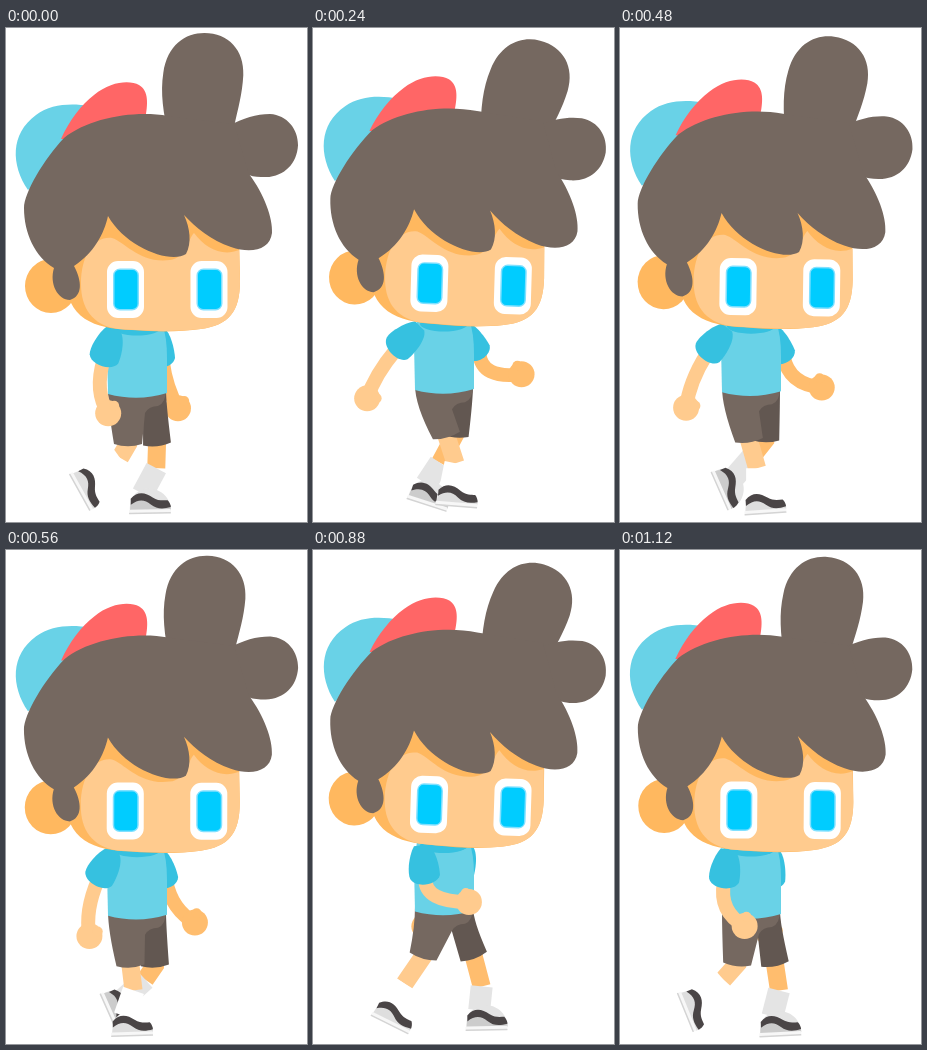
Write an HTML page with a canvas that moves like this. It is 301 px wide and 494 px high and loops after 1200 ms.

```html
<!DOCTYPE html>
<html lang="en">
<head>
<meta charset="utf-8">
<title>Walking boy</title>
<style>
html, body { margin: 0; width: 100%; height: 100%; overflow: hidden; background: #fff; }
canvas { display: block; width: 100vw; height: 100vh; }
</style>
</head>
<body>
<canvas id="stage" width="301" height="494"></canvas>
<script>
const ctx = document.getElementById('stage').getContext('2d');
const LOOP = 1200, STEP = 80;

const C = {
  hair: '#756860', skin: '#ffcb8e', shade: '#ffb85f', farSkin: '#ffbd6e',
  shirt: '#69d2e7', sleeve: '#36c1e0', red: '#ff6666',
  iris: '#00ccff', irisEdge: '#80e0ff',
  shorts: '#756860', farShorts: '#625751', shoe: '#4a4546'
};

const { sin, cos, hypot, PI } = Math;
const rad = deg => deg * PI / 180;
const turn = ms => 2 * PI * ms / LOOP;

// Rises from 0 to 1 and back twice per loop, once per step taken.
const bounce = (t, delay) => (1 - cos(2 * turn(t - delay))) / 2;

// Arm swing: s runs from -1 (near arm in front) to 1 (near arm behind).
const nearArm = s => ({
  shoulder: 105 - 4 * s,
  angle: 20 + 28 * s,
  elbow: [86 - 26 * s, 363 - 4 * s - 15 * s * s],
  hand: [98 - 53 * s + 6 * s * s, 386 + 8 * s - 27 * s * s]
});
const farArm = s => ({
  shoulder: 153,
  angle: -10 - 24 * s,
  elbow: [162 + 18 * s - 12 * s * s, 361 - 11 * s * s],
  hand: [176 + 50 * s - 16 * s * s, 379 - 17 * s - 20 * s * s]
});

// Both legs share one gait, half a loop apart.
function legPose(t, lift, mid, reach) {
  const a = turn(t), drop = cos(turn(t - 530));
  const stride = 37 * sin(a) - 16 * cos(a) - 9 * cos(2 * a) - 4 * sin(2 * a);
  return {
    hem: [mid + 12 * reach * sin(a), 416 - 9 * lift],
    sock: [mid - 4 + reach * (27 * sin(a) - 4 * cos(a)), 435 + 5.5 * drop],
    shoe: [mid - 13 + reach * stride, 466 + 8 * drop],
    angle: 22 + 31 * cos(a) - 17 * sin(a) + 8 * cos(2 * a) - 7 * sin(2 * a)
  };
}

function fill(d, color) {
  ctx.fillStyle = color;
  ctx.fill(new Path2D(d));
}

function line(d, color, width) {
  ctx.strokeStyle = color;
  ctx.lineWidth = width;
  ctx.stroke(new Path2D(d));
}

function oval(x, y, rx, ry, color) {
  ctx.fillStyle = color;
  ctx.beginPath();
  ctx.ellipse(x, y, rx, ry, 0, 0, 7);
  ctx.fill();
}

function box(x, y, w, h, r, color) {
  ctx.fillStyle = color;
  ctx.beginPath();
  ctx.roundRect(x, y, w, h, r);
  ctx.fill();
}

function at(x, y, deg, draw) {
  ctx.save();
  ctx.translate(x, y);
  ctx.rotate(rad(deg));
  draw();
  ctx.restore();
}

function pivot(x, y, deg, draw) {
  at(x, y, deg, () => { ctx.translate(-x, -y); draw(); });
}

function drawArm({ shoulder, angle, elbow, hand }, lift, skin, width) {
  const top = 308 - 4.5 * lift, a = rad(angle);
  const [ex, ey] = elbow, [hx, hy] = hand;
  line(`M${shoulder - 25 * sin(a)} ${top + 25 * cos(a)}Q${ex} ${ey} ${hx} ${hy}`, skin, 14);
  const len = hypot(hx - ex, hy - ey);
  const dx = (hx - ex) / len, dy = (hy - ey) / len;
  oval(hx, hy, 13, 13, skin);
  oval(hx + dy * 9 - dx * 3, hy - dx * 9 - dy * 3, 5, 5, skin);
  at(shoulder, top, angle, () => {
    ctx.scale(width, 1);
    fill('M-7-8C-14 2-17 18-15 24C-11 34 11 34 15 24C16 12 13-4 6-8Z', C.sleeve);
  });
}

function drawLeg({ hem, sock, shoe, angle }, skin, cloth, toe) {
  const a = rad(angle);
  const ax = shoe[0] - 7 * cos(a) + 8 * sin(a), ay = shoe[1] - 7 * sin(a) - 8 * cos(a);
  line(`M${hem[0]} ${hem[1] - 8}L${hem}L${sock}`, skin, 18);
  line(`M${sock}L${ax} ${ay}`, cloth, 22);
  at(shoe[0], shoe[1], angle, () => {
    fill('M-20 9C-21-8-9-13 0-13C13-12 21-2 21 9Z', cloth);
    fill('M-20 9L-19 1C-8-5-2 0 4 4C10 7 16 5 21 4L21 9Z', toe);
    fill('M-19-3C-12-11-4-9 3-4C9 0 14-1 18-1C20 1 21 4 21 6C13 8 7 8 1 3C-5-2-11-3-19 3Z', C.shoe);
    box(-21, 8, 42, 4, 1, '#f7f7f7');
    box(-21, 11, 42, 1.5, .5, '#d4d4d4');
  });
}

// Trouser edge square to the thigh, from its right corner to its left.
function hemEdge([hx, hy], hipX, hipY) {
  const dx = hx - hipX, dy = hy - hipY, k = 14 / hypot(dx, dy);
  const px = dy * k, py = -dx * k;
  return `${hx + px} ${hy + py}Q${hx + dx * .1} ${hy + dy * .1} ${hx - px} ${hy - py}`;
}

function drawShorts(near, far, w) {
  fill(`M130 ${w}L160 ${w}Q160 ${w + 14} ${hemEdge(far, 146, w + 10)}L137 ${w + 18}Z`, C.farShorts);
  fill(`M102 ${w}L160 ${w}Q160 ${w + 14} 152 ${w + 17}Q143 ${w + 17} 139 ${w + 24}`
    + `L${hemEdge(near, 122, w + 10)}Q102 ${w + 20} 102 ${w}Z`, C.shorts);
}

function drawShirt(lift) {
  ctx.save();
  ctx.translate(0, -4.3 * lift);
  fill('M104 296L156 296Q161 308 161 330L161 365Q132 374 102 366L101 320Z', C.shirt);
  oval(131, 300, 24, 7.5, C.sleeve);
  ctx.restore();
}

function drawEye(x) {
  box(x, 233, 37, 57, 11, '#fff');
  box(x + 6, 240.5, 26, 42, 7, C.irisEdge);
  box(x + 7.5, 242, 23, 39, 5, C.iris);
}

function drawHead(lift, sway) {
  ctx.save();
  ctx.translate(-3 * lift, -2.5 * lift);
  pivot(250, 250, 1.8 * lift, () => {
    oval(45, 258, 26, 27, C.shade);
    fill('M60 200L60 250C60 290 88 301 126 302C150 304 175 304 195 301C223 297 234 284 234 253L233 200L120 150Z', C.shade);
    fill('M75 256C75 226 89 208 106 210C119 214 134 236 164 232C180 230 182 211 188 205C199 220 216 229 233 222L234 253C234 284 223 297 195 301C172 304 140 303 112 301C86 297 75 280 75 256Z', C.skin);
    drawEye(101);
    drawEye(184.5);

    fill('M22 162C5 137 4 106 30 87C45 76 64 75 84 78L95 105L50 140Z', C.shirt);
    fill('M55 111C63 93 75 77 88 67C105 53 124 52 133 57C143 63 142 76 139 92L100 112Z', C.red);

    pivot(195, 120, 14 * sway, () => {
      ctx.translate(2 * sway, 8 * sway);
      fill('M163 110C157 85 154 65 157 45C161 17 179 5 198 5C222 5 238 22 237 47C236 66 232 80 228 98L222 135L175 135Z', C.hair);
    });
    pivot(200, 120, 6 * sway, () =>
      fill('M222 98C238 90 250 86 264 86C281 87 292 101 292 117C291 135 279 148 260 149C253 149 248 149 243 147L205 150Z', C.hair));

    fill('M18 180C18 165 38 131 58 110C83 90 128 82 162 88L228 96L243 146C258 166 267 190 266 205C264 222 245 226 225 219C205 212 190 200 178 187C184 200 186 215 180 226C165 236 120 220 102 188C98 206 88 225 68 238C76 253 77 268 64 272C52 272 43 256 48 240C29 229 18 205 18 180Z', C.hair);
  });
  ctx.restore();
}

function draw(t) {
  const lift = 1.08 * bounce(t, 10), sway = 1.08 * bounce(t, 22);
  const swing = cos(turn(t - 315));
  const near = legPose(t, lift, 122, 1);
  const far = legPose(t + LOOP / 2, lift, 151, .82);
  ctx.fillStyle = '#fff';
  ctx.fillRect(0, 0, 301, 494);
  drawArm(farArm(swing), lift, C.farSkin, .85);
  drawLeg(far, C.farSkin, '#e4e4e4', '#cccccc');
  drawLeg(near, C.skin, '#ffffff', '#dedede');
  drawShorts(near.hem, far.hem, 361 - 4 * lift);
  drawShirt(lift);
  drawArm(nearArm(swing), lift, C.skin, 1);
  drawHead(lift, sway);
}

const start = performance.now();
function tick() {
  const t = (performance.now() - start) % LOOP;
  draw(Math.floor(t / STEP) * STEP);
  requestAnimationFrame(tick);
}
tick();
</script>
</body>
</html>
```
